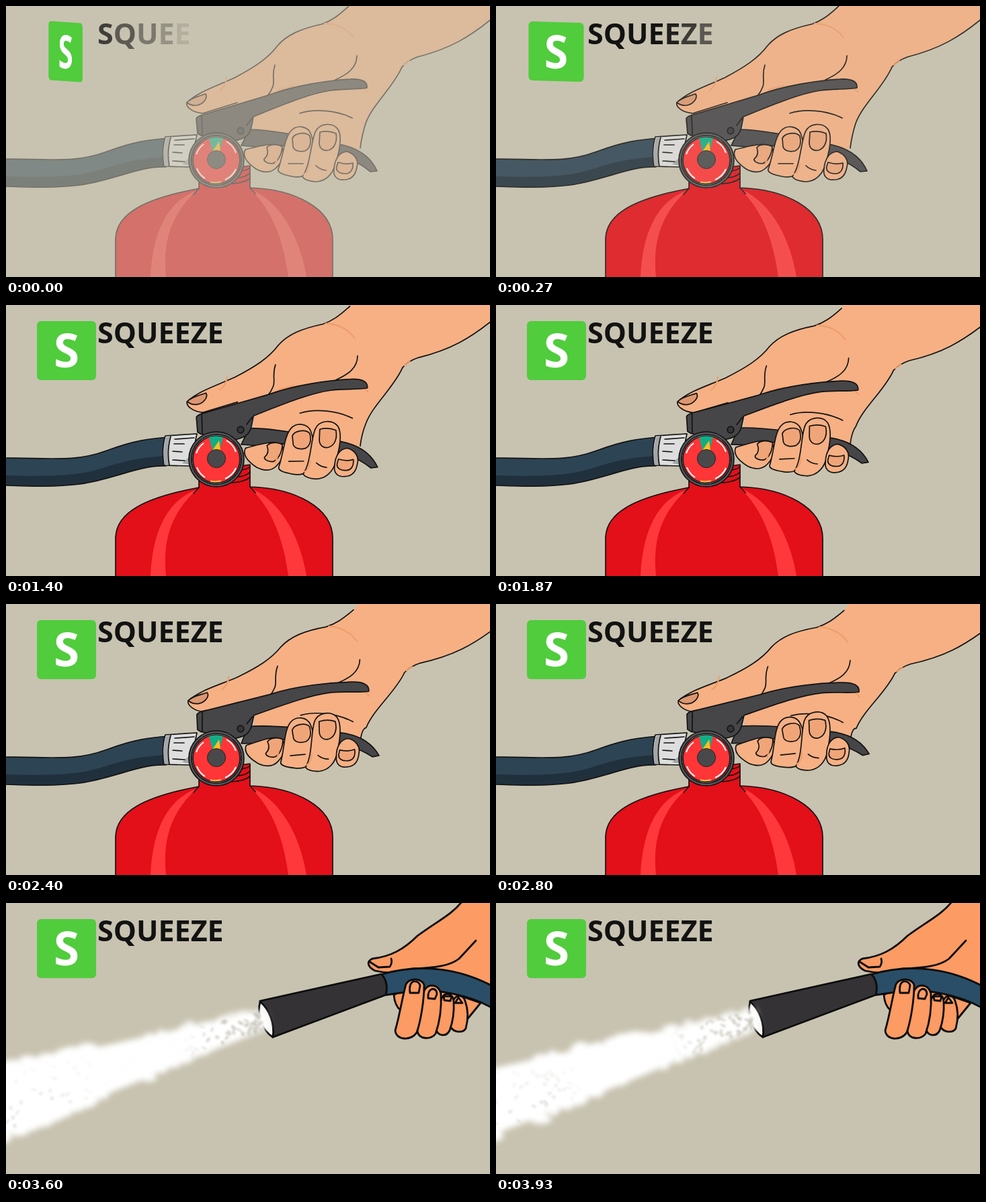
These frames come from a looping animation (720 px wide and 404 px high, 3.99 s). An HTML page:

```html
<!DOCTYPE html>
<html lang="en">
<head>
<meta charset="utf-8">
<title>Squeeze</title>
<style>
html, body { margin: 0; width: 100%; height: 100%; overflow: hidden; background: #c8c3b0; }
svg { display: block; width: 100%; height: 100%; }
text { font-family: "Open Sans", sans-serif; font-weight: 700; }
.ink { stroke: #121212; stroke-width: 1.7; stroke-linejoin: round; stroke-linecap: round; }
.bold { stroke: #0c0c0c; stroke-width: 2.8; stroke-linejoin: round; stroke-linecap: round; }
.line { fill: none; }
.skin { fill: #f6b084; }
.nail { fill: #f0a578; }
.blush { fill: none; stroke: #f09c68; stroke-width: 2; stroke-linecap: round; }
.lever { fill: #464548; }
.tan { fill: #fc9b63; }
</style>
</head>
<body>
<svg viewBox="0 0 720 404">
  <defs>
    <filter id="soft" x="-10%" y="-20%" width="120%" height="140%"><feGaussianBlur stdDeviation="4"/></filter>
    <filter id="haze" x="-10%" y="-20%" width="120%" height="140%"><feGaussianBlur stdDeviation="1.5"/></filter>
  </defs>
  <rect width="720" height="404" fill="#c8c3b0"/>

  <g id="grip">
    <g id="palm">
      <path id="palmFill" class="skin"/>
      <path id="palmEdge" class="ink line"/>
      <path class="ink line" d="M510 0C494 15 484 22 470 27C438 34 418 43 404 59C390 78 370 91 340 107C312 120 286 128 269 144C267 150 277 159 293 160L344 144"/>
      <path class="ink" fill="#dc9770" d="M269 144C275 137 286 135 297 131C301 138 292 147 284 148C278 149 273 147 269 144Z"/>
      <path class="ink line" d="M400 88C395 103 400 112 397 120Q394 128 389 134M522 74C522 92 508 102 490 110M437 160C458 153 491 155 515 167"/>
      <path class="blush" d="M474 26Q502 27 517 47M328 106Q328 118 318 126M526 116L538 128M405 125L428 119M592 88L600 82"/>
    </g>
    <g id="lower">
      <path class="ink lever" d="M350 208L362 184C388 184 418 190 440 194L500 207C530 214 545 230 552 246L542 247C530 237 510 225 480 219C440 210 400 204 372 210Z"/>
    </g>
    <g id="fingers" class="ink">
      <path class="skin" d="M356 214C350 225 362 236 372 243C385 250 395 248 402 241C412 232 416 215 408 209C400 203 380 208 356 214Z"/>
      <path class="nail" d="M388 211C393 205 405 206 411 210C410 222 404 233 396 235C388 235 383 231 384 228Q392 222 388 211Z"/>
      <path class="skin" d="M405 243C412 225 414 197 424 186C433 176 450 179 454 192C460 208 455 222 454 240C450 252 440 257 425 254C415 252 403 249 405 243Z"/>
      <path class="nail" d="M426 197C430 189 446 187 452 194C454 203 453 212 445 216C437 218 429 216 427 210Z"/>
      <path class="skin" d="M441 254C453 238 453 205 460 188C466 174 486 173 494 184C501 196 496 217 490 236C486 251 475 262 460 262C450 261 443 259 441 254Z"/>
      <path class="nail" d="M467 188Q480 185 491 190C493 202 489 212 480 215C472 217 466 212 466 204Z"/>
      <path class="skin" d="M488 243C489 227 497 217 508 217C519 221 525 230 522 240C520 252 514 259 503 259C493 260 486 254 488 243Z"/>
      <path class="nail" d="M494 233Q506 237 516 234C517 243 513 250 505 250C496 250 490 246 492 239Z"/>
      <path class="line" d="M420 235L442 235M461 238Q467 244 476 245"/>
      <path class="blush" d="M404 225L400 237M452 235Q450 248 443 251"/>
    </g>
    <g id="upper">
      <path class="ink lever" d="M283 168C284 164 291 162 300 160L390 133C430 118 480 111 512 109C528 108 538 112 537 122C520 125 505 123 482 126C450 131 410 148 368 165L365 181C362 194 354 198 340 201L290 193L285 190Z"/>
      <path class="ink line" d="M291 163L292 192M366 167L358 178"/>
      <circle class="ink" cx="349" cy="186" r="4.8" fill="#353438"/>
    </g>

    <path fill="#2d4454" d="M0 228C92 230 112 231 150 217C190 202 215 199 242 197L238 240C200 238 160 260 110 267C70 272 30 270 0 269Z"/>
    <path fill="#21303d" d="M0 254C105 257 122 250 160 238C190 229 215 226 240 225L238 240C200 238 160 260 110 267C70 272 30 270 0 269Z"/>
    <path class="ink line" d="M0 228C92 230 112 231 150 217C190 202 215 199 242 197M238 240C200 238 160 260 110 267C70 272 30 270 0 269"/>
    <path class="ink" fill="#dedede" d="M237 195L284 192L274 240L235 239Q231 215 237 195Z"/>
    <path fill="#a3a6a8" d="M238 197L245 196Q239 218 243 238L236 238Q233 215 238 197ZM262 236L274 225V238Z"/>
    <path class="ink line" d="M245 196Q239 218 243 239M251 200L280 198M250 207L265 207M248 218L262 219M248 231L266 232"/>

    <path class="ink" fill="#e30f19" d="M163 406V346C165 310 203 288 287 272L287 252L348 240L363 238V271C430 273 486 302 486 348V406Z"/>
    <path fill="#ff383b" d="M284 275C238 292 218 340 215 404H238C233 352 244 312 284 275ZM364 274C396 304 413 350 420 404H447C438 348 412 300 374 278Z"/>
    <path class="ink line" d="M346 246Q358 246 363 241M342 256Q356 256 363 249M336 265Q354 264 363 257M363 271L371 280M287 272L279 281"/>

    <circle class="ink" cx="313" cy="230" r="41" fill="#56565a"/>
    <circle class="ink" cx="313" cy="230" r="37" fill="#c9c6c4"/>
    <circle class="ink" cx="313" cy="230" r="35" fill="#ff3538"/>
    <g fill="none" stroke="#fff" stroke-width="2">
      <path d="M283 221A31 31 0 0 1 294 206M328 202A31 31 0 0 1 342 219M342 243A31 31 0 0 1 326 259M284 242A31 31 0 0 0 296 257"/>
      <path stroke="#ffc24a" d="M304 262.5Q313 264 320 262"/>
    </g>
    <path fill="#12ad86" d="M302 197Q313 194 323 197L318 216H307Z"/>
    <path fill="#ffbf22" d="M317 202L319 217H307Z"/>
    <circle cx="313" cy="229" r="13.5" fill="#49494b" stroke="#222" stroke-width="1"/>
  </g>

  <g id="nozzle">
    <path class="tan bold" d="M679 -3C664 17 640 28 612 49C592 69 572 80 545 83C535 88 539 96 549 101C570 106 590 104 606 98L640 110L724 130V-3Z"/>
    <path class="bold line" d="M540 87L554 96L571 95Q575 89 573 83M699 56L674 83C660 94 640 96 606 98"/>
    <path class="tan bold" d="M577 137C578 150 582 156 587 160L684 176L706 149L640 126L590 130Z"/>
    <path class="bold" fill="#2a4e67" d="M556 107C600 94 660 90 724 124V157C690 137 640 127 600 132L566 137Z"/>
    <g class="tan bold">
      <path d="M661 184C662 168 662 155 665 147C668 136 680 136 683 146C688 160 687 176 684 187C680 194 666 194 661 184Z"/>
      <path d="M640 188C642 165 645 150 648 142C654 131 665 135 666 147C667 164 664 179 660 190C655 200 642 199 640 188Z"/>
      <path d="M612 191C616 165 617 140 623 129C630 119 644 122 647 135C648 155 645 178 639 195C632 204 614 204 612 191Z"/>
      <path d="M579 190C586 166 590 138 595 121C601 111 618 112 622 122C622 145 617 176 611 193C603 206 580 205 579 190Z"/>
      <path class="line" d="M601 134Q599 120 606 117Q614 116 616 123L614 134ZM628 142Q627 131 634 128Q641 128 641 136L638 143ZM651 139L663 139L661 146L652 145ZM668 149L673 141L679 149Z"/>
    </g>
    <path class="bold" fill="#343234" d="M378 146L558 106C566 113 568 125 565 137L397 200Z"/>
    <path class="bold" fill="#f4f3f1" d="M378 147C373 166 381 190 397 200C400 180 392 159 378 147Z"/>
    <g filter="url(#soft)">
      <path fill="#fff" d="M388 166L378 160L270 185L150 212L-20 250V352L180 273L300 223L392 186Z"/>
      <g id="fringe" fill="#fff"></g>
    </g>
    <g id="holes" filter="url(#haze)" fill="#c4c0b4"></g>
  </g>

  <g id="tile">
    <rect x="-44" y="-44" width="88" height="88" rx="6" fill="#50cc3c"/>
    <text y="25" font-size="69" text-anchor="middle" fill="#fff">S</text>
  </g>
  <text id="word" x="136" y="57" font-size="43" fill="#121212"></text>
</svg>
<script>
(() => {
  const LOOP = 3990, CUT = 3000, SQUEEZE = 1130;
  const $ = id => document.getElementById(id);
  const clamp = v => Math.max(0, Math.min(1, v));
  const set = (el, attrs) => { for (const k in attrs) el.setAttribute(k, attrs[k]); };

  function add(parent, tag, n) {
    return Array.from({ length: n }, () =>
      parent.appendChild(document.createElementNS("http://www.w3.org/2000/svg", tag)));
  }

  const letters = add($("word"), "tspan", 7);
  letters.forEach((el, i) => el.textContent = "SQUEEZE"[i]);

  let seed = 17;
  const rand = () => (seed = seed * 16807 % 2147483647) / 2147483647;
  const drops = (id, n) => add($(id), "ellipse", n).map(el =>
    ({ el, along: rand(), across: rand(), size: rand(), side: rand() < 0.5 }));
  const fringe = drops("fringe", 70), holes = drops("holes", 130);

  // Edges of the spray cone at a given x
  const coneTop = x => 155 + (380 - x) * 0.224;
  const coneBottom = x => 190 + (390 - x) * 0.415;

  function drawSpray(t) {
    for (const d of fringe) {
      const u = (d.along + t / 900) % 1, x = 385 - 400 * u;
      const inset = 1 + 8 * d.across;
      set(d.el, {
        cx: x, cy: d.side ? coneTop(x) + inset : coneBottom(x) - inset,
        rx: 4 + 13 * u * d.size + 3 * u, ry: 2 + 6 * u
      });
    }
    for (const d of holes) {
      const u = (d.along + t / 900) % 1, x = 380 - 385 * Math.pow(u, 1.5);
      const near = clamp((x - 262) / 55), far = clamp((135 - x) / 60);
      const v = 0.12 + 0.76 * d.across;
      const y = coneTop(x) + (coneBottom(x) - coneTop(x)) * v;
      set(d.el, {
        cx: x, cy: y, rx: 1.5 + 3.5 * d.size, ry: 1.3 + 2.5 * (1 - d.size),
        transform: `rotate(${d.side ? -45 : 25} ${x} ${y})`,
        opacity: 0.65 * near + 0.4 * far * clamp(v * 1.3) + 0.02
      });
    }
  }

  function drawGrip(t) {
    const p = Math.min(1.12, Math.max(0, (t - SQUEEZE) / 1270));
    const y = 212 - 18 * p;
    const edge = `C689 50 655 65 612 76Q598 81 589 91C577 120 545 147 535 175Q529 ${y - 18} 527 ${y}`;
    set($("palmEdge"), { d: "M740 4" + edge });
    set($("palmFill"), {
      d: `M510 0C494 15 484 22 470 27C438 34 418 43 404 59C390 78 370 91 340 107
        C312 120 286 128 269 144C267 150 277 159 293 160L368 160V182L400 205L490 220L527 ${y}
        Q529 ${y - 18} 535 175C545 147 577 120 589 91Q598 81 612 76C655 65 689 50 740 4V-30H530Z`
    });
    set($("palm"), { transform: `translate(${2 * p} 0) rotate(${2 * p} 268 147)` });
    set($("upper"), { transform: `rotate(${2.5 * p} 349 186)` });
    set($("lower"), { transform: `translate(${-2 * p} 0) rotate(${-5.6 * p} 349 186)` });
    set($("fingers"), { transform: `translate(${-p} ${-2.5 * p}) rotate(${-5 * p} 349 186)` });
    set($("grip"), { opacity: clamp(0.45 + t / 700) });
  }

  function drawTitle(t) {
    const turn = 55 * Math.pow(1 - clamp(t / 530), 1.35);
    const wide = Math.cos(turn * Math.PI / 180);
    set($("tile"), { transform: `translate(${90 - turn / 40} 68) skewY(${turn / 14}) scale(${wide} 1)` });
    letters.forEach((el, i) => set(el, { "fill-opacity": clamp(0.75 - 0.16 * i + 0.003 * t) }));
  }

  function draw(t) {
    const spraying = t >= CUT;
    $("grip").style.display = spraying ? "none" : "";
    $("nozzle").style.display = spraying ? "" : "none";
    if (spraying) drawSpray(t - CUT); else drawGrip(t);
    drawTitle(t);
  }

  const start = performance.now();
  function tick() {
    draw((performance.now() - start) % LOOP);
    requestAnimationFrame(tick);
  }
  tick();
})();
</script>
</body>
</html>
```
